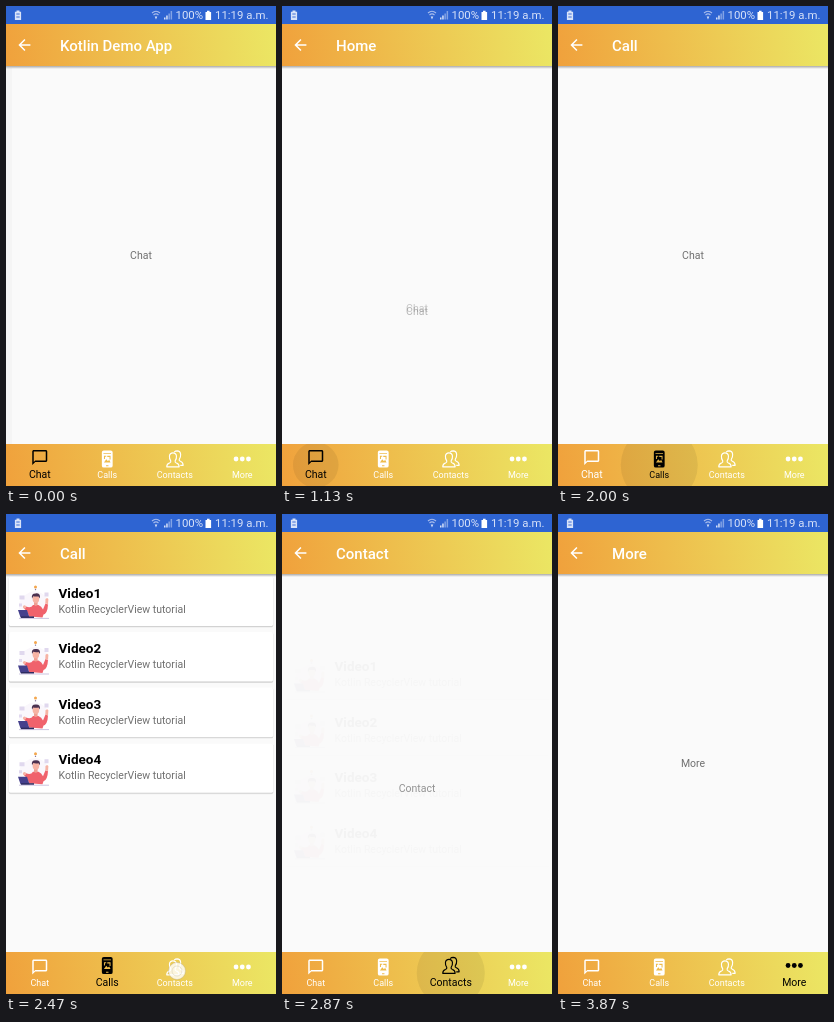
An HTML page for the animation above (3990 ms loop, 270x480 px).

```html
<!DOCTYPE html>
<html lang="en">
<head>
<meta charset="utf-8">
<title>Kotlin Demo App</title>
<style>
  html, body { margin: 0; height: 100%; overflow: hidden; background: #fafafa; }
  svg { display: block; width: 100vw; height: 100vh; font-family: Roboto, "Noto Sans", sans-serif; }
  .title { font-size: 15px; font-weight: 500; fill: #fff; }
  .body { font-size: 10.5px; fill: #707070; }
  .name { font-size: 13.5px; font-weight: 700; fill: #000; }
  .status { font-size: 11.4px; fill: #d8e2f8; }
  .mid { text-anchor: middle; }
</style>
</head>
<body>
<svg viewBox="0 0 270 480" preserveAspectRatio="none">
  <defs>
    <linearGradient id="bar" gradientUnits="userSpaceOnUse" x1="0" y1="42" x2="270" y2="0">
      <stop offset="0" stop-color="#f0a13c"/>
      <stop offset="1" stop-color="#ebe764"/>
    </linearGradient>
    <linearGradient id="shade" x2="0" y2="1">
      <stop offset="0" stop-color="#000" stop-opacity=".32"/>
      <stop offset="1" stop-color="#000" stop-opacity="0"/>
    </linearGradient>
    <clipPath id="view"><rect y="60" width="270" height="378"/></clipPath>
    <clipPath id="foot"><rect y="438" width="270" height="42"/></clipPath>

    <g id="card">
      <rect x="2.5" y=".5" width="265" height="50.500" rx="2" fill="#000" opacity=".07"/>
      <rect x="3" y=".5" width="264" height="49.900" rx="1.5" fill="#000" opacity=".13"/>
      <rect x="3" y="0" width="264" height="49.600" rx="1.5" fill="#fff"/>
      <path d="M13 33Q12 22 20 18Q28 12 36 17Q45 22 42 33Z" fill="#faf7fc"/>
      <path d="M13.500 19h5v4h-5zM38.500 16h4v4h-4zM13 27h3v3h-3z" fill="#e0d8ee"/>
      <circle cx="29.500" cy="10.500" r="1.500" fill="#f3a64d"/>
      <path d="M28.900 12.500h1.200v1.300h-1.200z" fill="#8b7aa0"/>
      <path d="M23 40Q22 35 18 32L20 30Q25 32 27 28.500H32.500Q35.500 29.500 37 33L39.500 27L42 28Q41.500 37 37.500 38L36.500 41Z" fill="#f0626c"/>
      <path d="M39.300 27.200l.2-4.500l1.600-1l1.300 1l-.4 5z" fill="#f6b3a4"/>
      <circle cx="18.500" cy="30.500" r="1.600" fill="#f6b3a4"/>
      <path d="M28 25h3.600v3.700q-1.800 1.600-3.600 0z" fill="#ef9f92"/>
      <ellipse cx="29.900" cy="22.500" rx="3.300" ry="4" fill="#f6b3a4"/>
      <path d="M26 22Q25 17 29.500 17Q34.800 16.500 33.900 22L32.500 20Q29.500 20.500 27.300 19.800Z" fill="#4b3150"/>
      <path d="M12 33.500h9l2.500 7.500H14.500z" fill="#45408c"/>
      <path d="M15 40h13v1.600H15z" fill="#2d2b60"/>
      <path d="M13 42h30" stroke="#a89dcb" stroke-width=".6"/>
    </g>
  </defs>

  <rect width="270" height="480" fill="#fafafa"/>
  <rect id="edge" y="62" width="6" height="376" fill="#f5f5f5"/>
  <g id="pages" clip-path="url(#view)"></g>

  <rect width="270" height="18" fill="#2e64d2"/>
  <g fill="#d8e2f8">
    <path d="M10.500 4.500h3v1.200h1.600V14H8.900V5.700h1.600z"/>
    <path d="M10.300 8h3.400M10.300 11h3.400" stroke="#2e64d2" stroke-width=".9"/>
    <path d="M146 7q4-3.600 8 0M147.500 9q2.500-2.300 5 0" fill="none" stroke="#a9bdec" stroke-width="1.100"/>
    <path d="M148.700 10.500h2.600L150 13.500z"/>
    <path d="M158 13.500h1.500v-2H158zM160.200 13.500h1.500V9.500h-1.500z"/>
    <path d="M162.400 13.500h1.500V7.500h-1.500zM164.600 13.500h1.500V5h-1.500z" opacity=".5"/>
    <path d="M201 4.800h2.600v1.100h1.500v8h-5.600v-8h1.500z" fill="#fff"/>
  </g>
  <text class="status" x="169.500" y="13.200">100%</text>
  <text class="status" x="209" y="13.200">11:19 a.m.</text>

  <rect y="60" width="270" height="3" fill="url(#shade)"/>
  <rect width="270" height="42" fill="url(#bar)" transform="translate(0 18)"/>
  <path transform="translate(9.400 30) scale(.75)" fill="#fff"
        d="M20 11H7.830l5.590-5.590L12 4l-8 8 8 8 1.410-1.410L7.830 13H20v-2z"/>
  <text id="title" class="title" x="54" y="45"></text>

  <rect width="270" height="42" fill="url(#bar)" transform="translate(0 438)"/>
  <circle id="ripple" clip-path="url(#foot)"/>
  <g id="tabs"></g>
  <g id="touch">
    <circle r="8.500" fill="#fff" fill-opacity=".8" stroke="#a89f8c" stroke-opacity=".4" stroke-width=".8"/>
    <circle r="5" fill="none" stroke="#c9c0a8" stroke-opacity=".5" stroke-width=".8"/>
  </g>
</svg>

<script>
const LOOP = 3990, SLIDE = 300, GROW = 115, RIPPLE = 350;
const $ = id => document.getElementById(id);
const clamp = x => Math.min(1, Math.max(0, x));
const swing = x => (1 - Math.cos(Math.PI * clamp(x))) / 2;

const label = text => `<text class="body mid" x="135" y="253.300">${text}</text>`;
const videos = [1, 2, 3, 4].map((n, i) => `<g transform="translate(0 ${62.4 + i * 55.6})">
  <use href="#card"/>
  <text class="name" x="52.500" y="21.300">Video${n}</text>
  <text class="body" x="52.500" y="36.300">Kotlin RecyclerView tutorial</text></g>`).join('');

// Times in ms: select = title and colour, move = page slide, touch = x, y, down, up.
const steps = [
  { title: 'Kotlin Demo App', tab: 0, page: label('Chat'), select: -999, move: -999 },
  { title: 'Home', tab: 0, page: label('Chat'), select: 960, move: 983, dist: 108,
    touch: [37, 460, 830, 1000], wave: 1050 },
  { title: 'Call', tab: 1, page: videos, select: 1960, move: 2030, dist: 98,
    touch: [101, 459, 1800, 1970], wave: 1800 },
  { title: 'Contact', tab: 2, page: label('Contact'), select: 2640, move: 2670, dist: 98,
    touch: [171, 457, 2440, 2650], wave: 2725 },
  { title: 'More', tab: 3, page: label('More'), select: 3490, move: 3503, dist: 98,
    touch: [242, 467, 3400, 3570], wave: 3510 }
];

const icons = [
  ['Chat', `<path transform="translate(-9 -9) scale(.75)" d="M20 2H4c-1.100 0-2 .9-2 2v18l4-4h14c1.100 0 2-.9 2-2V4c0-1.100-.9-2-2-2zm0 14H6l-2 2V4h16v12z"/>`],
  ['Calls', `<path fill-rule="evenodd" d="M-3.500-8.600H3.500Q5.400-8.600 5.400-6.700V6.700Q5.400 8.600 3.500 8.600H-3.500Q-5.400 8.600-5.400 6.700V-6.700Q-5.400-8.600-3.500-8.600Z
    M-3.800-6V-5.300H3.800V-6Z M-1.200 6.200V7.200H1.200V6.200Z M-3.300-3.200H-1V-2.200H-2.300V0H-3.300Z M0-3.200H3.300V.5H2.300V-2H0Z
    M-3.300 3.500L-1 .3L.5 2L2 .9L3.300 3.500Z"/>`],
  ['Contacts', `<g fill="none" stroke="currentColor" stroke-width="1.150" stroke-linejoin="round">
    <path d="M-8 7.800Q-8 4.800-5.200 4Q-3.500 3.300-4 1.800Q-5.600-.2-5.300-3Q-4.900-6.200-1.800-6.200Q1.300-6.200 1.700-3Q2-.2 .4 1.800Q-.1 3.300 1.600 4Q4.400 4.800 4.400 7.800Z"/>
    <path d="M-.6-6.900Q.6-8.100 2.400-8.100Q5.600-7.900 5.900-4.700Q6.100-1.800 4.500 .3Q4 1.700 5.600 2.300Q8.400 3.300 8.400 6.300H5.500"/></g>`],
  ['More', [-6.2, 0, 6.2].map(x => `<circle cx="${x}" r="2.400"/>`).join('')]
];

$('pages').innerHTML = steps.map(s => `<g>${s.page}</g>`).join('');
$('tabs').innerHTML = icons.map(([name, art], i) =>
  `<g transform="translate(${33.75 + i * 67.5} 0)" fill="currentColor"><g>${art}</g>
   <text class="mid" y="472.300">${name}</text></g>`).join('');
const pages = [...$('pages').children], tabs = [...$('tabs').children];

function drawPages(t) {
  steps.forEach((s, i) => {
    const next = steps[i + 1];
    const enter = swing((t - s.move) / SLIDE);
    const exit = next ? swing((t - next.move) / SLIDE) : 0;
    const y = (1 - enter) * (s.dist || 0) + exit * (next ? next.dist : 0);
    pages[i].setAttribute('transform', `translate(0 ${y})`);
    pages[i].setAttribute('opacity', enter * clamp(1 - 1.3 * exit));
  });
}

function drawTabs(t, now) {
  tabs.forEach((tab, i) => {
    const first = steps.find(s => s.tab === i);
    const after = steps.find(s => s.tab === i + 1);
    const grown = s => s ? swing((t - s.move) / GROW) : 0;
    const size = grown(first) - grown(after);
    tab.style.color = now.tab === i ? '#000' : '#fff';
    tab.children[0].setAttribute('transform', `translate(0 ${453 - 1.5 * size})`);
    tab.children[1].setAttribute('font-size', 9 + 1.5 * size);
  });
}

function drawTouch(t) {
  const hit = steps.find(s => s.touch && t >= s.touch[2] && t < s.touch[3]);
  $('touch').setAttribute('opacity', hit ? clamp((hit.touch[3] - t) / 80) : 0);
  if (hit) $('touch').setAttribute('transform', `translate(${hit.touch[0]} ${hit.touch[1]})`);

  const wave = steps.find(s => t >= s.wave && t < s.wave + RIPPLE);
  const age = wave ? t - wave.wave : 0;
  const ripple = $('ripple');
  ripple.setAttribute('r', 39 * (1 - (1 - clamp(age / 225)) ** 2));
  ripple.setAttribute('opacity', .065 * clamp((RIPPLE - age) / 150));
  if (wave) {
    ripple.setAttribute('cx', 33.75 + wave.tab * 67.5);
    ripple.setAttribute('cy', 459);
  }
}

let start;
function frame(time) {
  start ??= time;
  const t = (time - start) % LOOP;
  const now = steps.findLast(s => t >= s.select);
  $('title').textContent = now.title;
  $('edge').setAttribute('opacity', t < steps[1].move ? 1 : 0);
  drawPages(t);
  drawTabs(t, now);
  drawTouch(t);
  requestAnimationFrame(frame);
}
requestAnimationFrame(frame);
</script>
</body>
</html>
```
